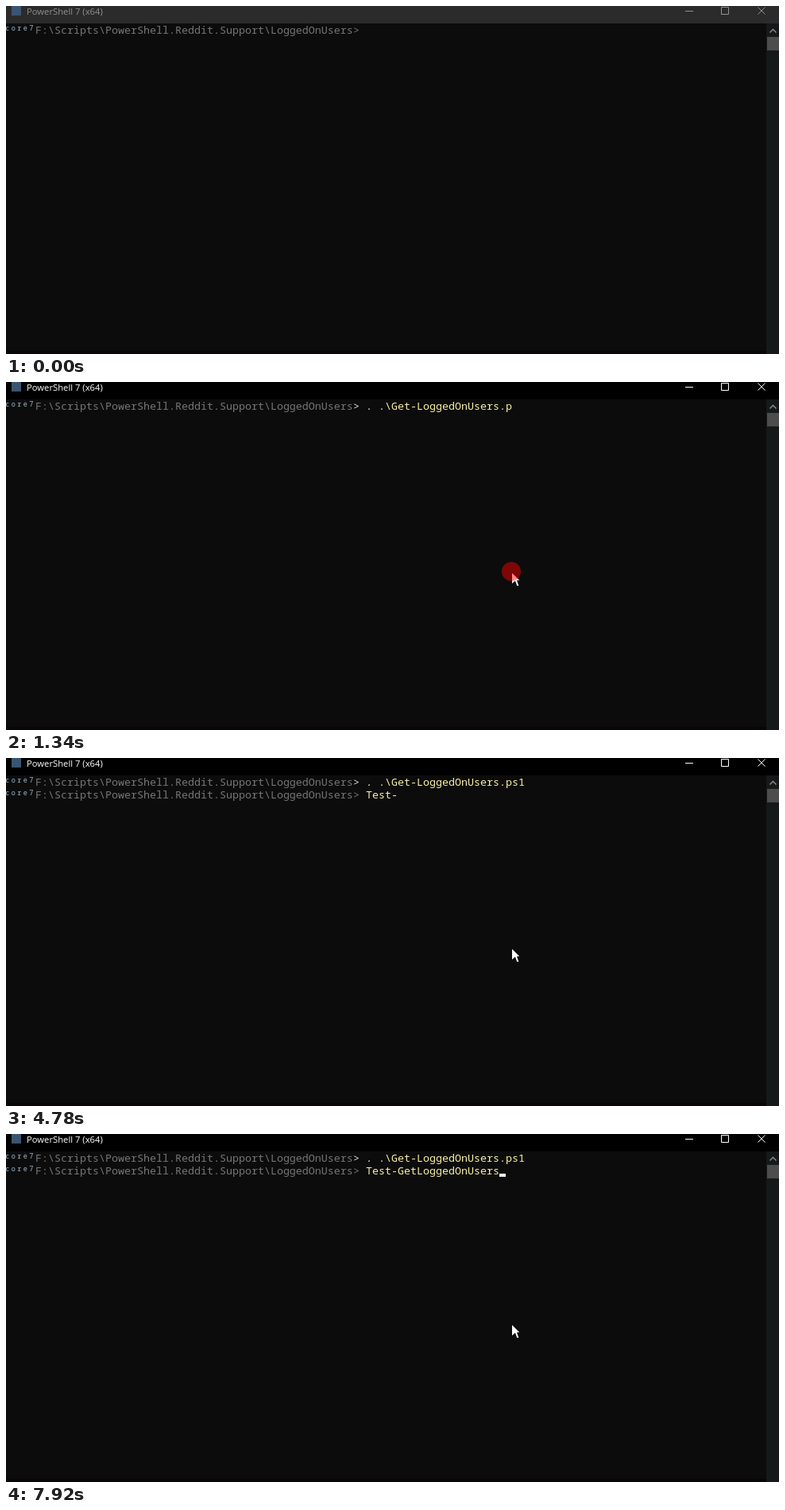
Write an HTML page that moves like this. It is 973x439 px and loops after 8000 ms.

```html
<!DOCTYPE html>
<html lang="en">
<head>
<meta charset="utf-8">
<title>Terminal</title>
<style>
html, body { margin: 0; width: 100%; height: 100%; overflow: hidden; background: #0c0c0c; }
svg { display: block; width: 973px; height: 439px; }
text { white-space: pre; }
.title { font: 11.25px "Open Sans", "Noto Sans", sans-serif; }
.mono { font: 13.333px "Noto Sans Mono", "DejaVu Sans Mono", monospace; }
.badge { font: 8.5px "Noto Sans Mono", "DejaVu Sans Mono", monospace; fill: #9dbace; }
.path { fill: #767676; }
.input { fill: #f9f1a5; }
</style>
</head>
<body>
<svg viewBox="0 0 973 439">
  <rect width="973" height="439" fill="#0c0c0c"/>
  <rect y="435" width="957" height="4" fill="#0b0508"/>
  <rect x="957" y="22" width="16" height="417" fill="#161919"/>
  <path d="M961.5 33.5l4-4l4 4" fill="none" stroke="#868b8b" stroke-width="1.5"/>
  <rect x="958" y="39" width="15" height="17" fill="#4d4d4d"/>

  <rect id="bar" width="973" height="22"/>
  <rect x="7" y="0" width="12" height="12" fill="#3a5572"/>
  <text id="title" class="title" x="26" y="11">PowerShell 7 (x64)</text>
  <path id="buttons" d="M855 6.5h10M900.5 1.5h9v9h-9zM946.5 1.5l9 9M955.5 1.5l-9 9" fill="none"/>

  <g id="rows"></g>
  <rect id="caret" width="8" height="4" fill="#f2f2f2"/>
  <g id="mouse">
    <path d="M0 0L9.3 9.3H6L8.3 16H6.2L4.2 10.3H3.2L0 13.3Z" fill="#fff"/>
    <circle id="press" cx="-1" cy="-2" r="12" fill="#f00" fill-opacity=".47"/>
  </g>
</svg>
<script>
const LOOP = 8000, CELL = 8, LINE = 16, INPUT_X = 453;
const PATH = "F:\\Scripts\\PowerShell.Reddit.Support\\LoggedOnUsers";
const FOCUS = 640, PASTE = 1340, PASTED = 1370, ENTER = 2480, READY = 2700;
const BLINK = 523, FIRST_BLINK = 1115;

// Each burst of input: start, ms per key (0 = all at once), text.
const commands = [
  [[PASTE, 0, ". .\\Get-LoggedOnUsers.p"], [PASTED, 0, "s1"]],
  [[4010, 180, "Test-Get"], [6850, 160, "Lo"], [7270, 0, "ggedOnUsers"]]
].map(bursts => bursts.flatMap(([start, pace, text]) =>
  [...text].map((char, i) => ({ time: start + i * pace, char }))));

const resets = [FIRST_BLINK, ENTER, READY, ...commands.flat().map(k => k.time)];

const $ = id => document.getElementById(id);
const set = (el, attrs) => { for (const k in attrs) el.setAttribute(k, attrs[k]); };
const show = (el, on) => set(el, { visibility: on ? "visible" : "hidden" });
const between = (t, a, b) => t >= a && t < b;

function add(parent, tag, attrs, text = "") {
  const el = document.createElementNS("http://www.w3.org/2000/svg", tag);
  set(el, attrs);
  el.textContent = text;
  parent.append(el);
  return el;
}

function makeRow(i) {
  const g = add($("rows"), "g", { transform: `translate(0 ${i * LINE})` });
  [..."core7"].forEach((c, k) =>
    add(g, "text", { class: "badge", x: k * 7.5 - 0.7, y: 31 }, c));
  add(g, "text", { class: "mono path", x: 37, y: 35 }, PATH);
  const mark = add(g, "text", { class: "mono", x: 437, y: 35, fill: "#767676" }, ">");
  const input = add(g, "text", { class: "mono input", x: INPUT_X, y: 35 });
  return { g, mark, input };
}

const rows = commands.map((_, i) => makeRow(i));

const typed = (row, t) =>
  commands[row].filter(k => k.time <= t).map(k => k.char).join("");

// The blink clock runs freely; every key turns the caret on until the next tick.
function caretOn(t) {
  if (t < FIRST_BLINK || between(t, PASTE, PASTED)) return false;
  const ticks = time => Math.floor((time - FIRST_BLINK) / BLINK);
  const last = Math.max(...resets.filter(r => r <= t));
  return (ticks(t) - ticks(last)) % 2 === 0;
}

function ease(t, start, end) {
  const u = Math.min(1, Math.max(0, (t - start) / (end - start)));
  return u * u * (3 - 2 * u);
}

function pointerAt(t) {
  const enter = ease(t, 90, 550), move = ease(t, 1040, 1120);
  return [462 + 43 * enter + 132 * move, 440 - 234 * enter + 35 * move];
}

function draw(t) {
  const active = t >= FOCUS;
  set($("bar"), { fill: active ? "#000" : "#2b2b2b" });
  set($("title"), { fill: active ? "#fff" : "#909090" });
  set($("buttons"), { stroke: active ? "#fff" : "#929292" });

  const row = t < ENTER ? 0 : 1;
  rows.forEach((r, i) => { r.input.textContent = typed(i, t); });
  set(rows[0].mark, { fill: t < PASTE ? "#767676" : "#e0e0e0" });
  show(rows[1].g, row === 1);
  set($("caret"), { x: INPUT_X + typed(row, t).length * CELL, y: 34 + row * LINE });
  show($("caret"), caretOn(t));

  const [x, y] = pointerAt(t);
  set($("mouse"), { transform: `translate(${x} ${y})` });
  show($("mouse"), t >= 90);
  show($("press"), between(t, 570, 670) || between(t, PASTE, PASTE + 100));
}

function tick() {
  draw(performance.now() % LOOP);
  requestAnimationFrame(tick);
}
tick();
</script>
</body>
</html>
```
